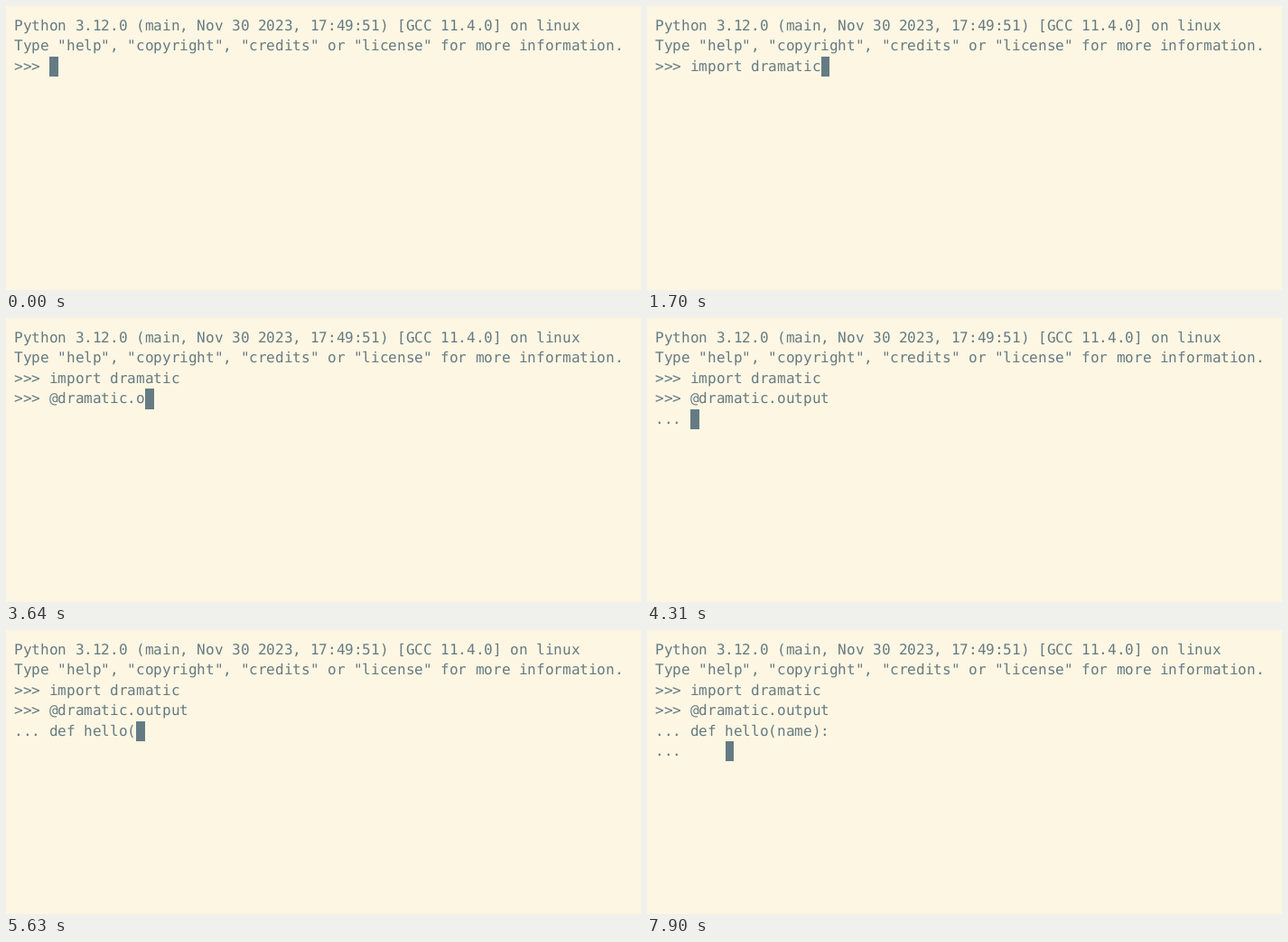
These frames come from a looping animation (703 px wide and 314 px high, 8000 ms). An HTML page:

```html
<!DOCTYPE html>
<html lang="en">
<head>
<meta charset="utf-8">
<title>Python session</title>
<style>
  html, body { margin: 0; width: 100%; height: 100%; overflow: hidden; background: #fdf6e3; }
  svg { display: block; width: 703px; height: 314px; fill: #657b83; }
  text {
    font: 16px "DejaVu Sans Mono", monospace;
    white-space: pre;
    text-rendering: geometricPrecision;
  }
  rect { shape-rendering: crispEdges; }
</style>
</head>
<body>
<svg viewBox="0 0 703 314"><rect id="cursor"/></svg>
<script>
const LOOP = 8000;
const COLS = 71;
const COL = 9.632;
const ROW = 22.4;
const TOP = 11;
const ASCENT = 16;

const INTRO = `Python 3.12.0 (main, Nov 30 2023, 17:49:51) [GCC 11.4.0] on linux
Type "help", "copyright", "credits" or "license" for more information.
>>> `;

// [start, end, text]: typed evenly from start to end, or all at once if they are equal
const BURSTS = [
  [350, 670, "impor"],
  [830, 1060, "t d"],
  [1190, 1630, "ramati"],
  [1700, 1700, "c"],
  [1850, 1850, "\n>>> "],
  [2520, 2520, "@"],
  [2670, 2800, "dr"],
  [2890, 3460, "amatic."],
  [3640, 3710, "ou"],
  [3815, 3920, "tp"],
  [4060, 4140, "ut"],
  [4310, 4310, "\n... "],
  [4540, 4540, "d"],
  [4680, 4800, "ef "],
  [5070, 5070, "h"],
  [5180, 5430, "ello"],
  [5630, 5630, "("],
  [5910, 6190, "name"],
  [6380, 6380, ")"],
  [6820, 6820, ":"],
  [7040, 7040, "\n... "],
  [7430, 7430, " "],
  [7600, 7600, " "],
  [7760, 7760, " "],
  [7900, 7900, " "],
];

const svg = document.querySelector("svg");
const cursor = document.getElementById("cursor");
const rowTop = row => TOP + Math.round(ROW * row);
const colLeft = col => COL * (col + 1);

function setAttrs(el, attrs) {
  for (const key in attrs) el.setAttribute(key, attrs[key]);
}

// Glyphs sit on whole pixels of the terminal grid
const glyphXs = Array.from({ length: COLS }, (_, col) => Math.floor(colLeft(col))).join(" ");

const rows = Array.from({ length: 6 }, (_, row) => {
  const el = document.createElementNS("http://www.w3.org/2000/svg", "text");
  setAttrs(el, { x: glyphXs, y: rowTop(row) + ASCENT });
  return svg.appendChild(el);
});

function typed([start, end, text], time) {
  if (time < start) return "";
  if (time >= end) return text;
  const gap = (end - start) / (text.length - 1);
  return text.slice(0, Math.floor((time - start) / gap + 1e-6) + 1);
}

function placeCursor(col, row) {
  const x = Math.round(colLeft(col));
  const y = rowTop(row);
  setAttrs(cursor, {
    x, y,
    width: Math.round(colLeft(col + 1)) - x,
    height: rowTop(row + 1) - y,
  });
}

let shown = null;

function draw(time) {
  const screen = INTRO + BURSTS.map(burst => typed(burst, time)).join("");
  if (screen === shown) return;
  shown = screen;
  const lines = screen.split("\n");
  rows.forEach((el, i) => { el.textContent = lines[i] || ""; });
  placeCursor(lines.at(-1).length, lines.length - 1);
}

const begin = performance.now();

function tick() {
  draw((performance.now() - begin) % LOOP);
  requestAnimationFrame(tick);
}
tick();
</script>
</body>
</html>
```
